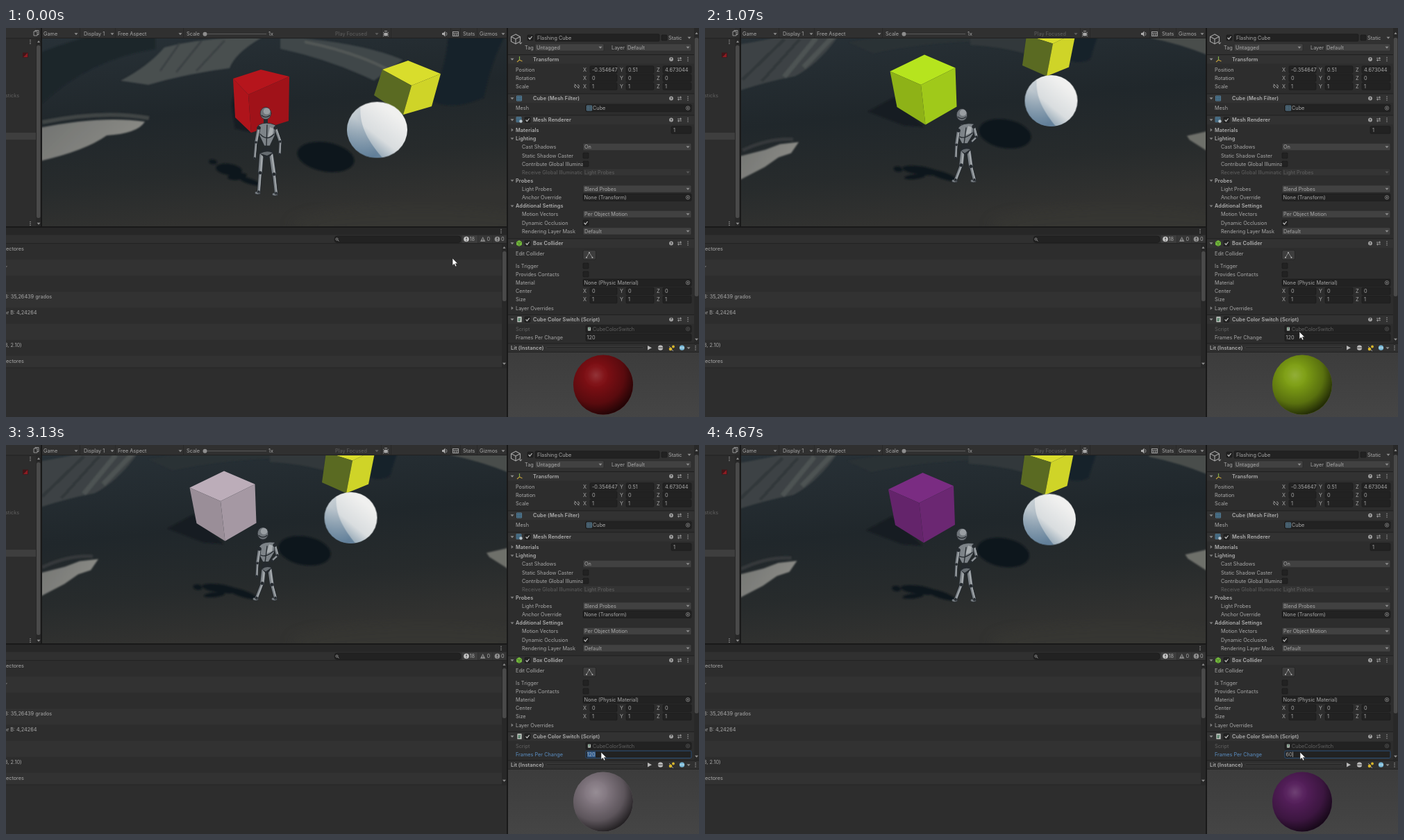
An HTML page for the animation above (4740 ms loop, 998 by 561 pixels).

```html
<!DOCTYPE html>
<html lang="en">
<head>
<meta charset="utf-8">
<title>Flashing cube</title>
<style>
html, body { margin: 0; width: 100%; height: 100%; overflow: hidden; background: #2d2d2d; }
svg { display: block; width: 100%; height: 100%; }
text { font: 7.3px Inter, Roboto, sans-serif; fill: #a8a8a8; white-space: pre; }
.b { font-weight: 600; fill: #b0b0b0; letter-spacing: .1px; }
.d { fill: #606060; }
.hot { fill: #5b8fc4; }
</style>
</head>
<body>
<svg id="stage" viewBox="0 0 998 561" xmlns="http://www.w3.org/2000/svg">
<defs>
  <clipPath id="view"><rect x="52" y="15" width="669" height="271"/></clipPath>
  <clipPath id="unit"><circle r="1"/></clipPath>
  <filter id="soft"><feGaussianBlur stdDeviation="1"/></filter>
  <filter id="haze"><feGaussianBlur stdDeviation="9"/></filter>
  <linearGradient id="ground" x1="0" y1="0" x2=".25" y2="1">
    <stop offset="0" stop-color="#283137"/><stop offset=".45" stop-color="#20272b"/>
    <stop offset=".75" stop-color="#272b2c"/><stop offset="1" stop-color="#323230"/>
  </linearGradient>
  <linearGradient id="patch" x1="0" y1="0" x2="1" y2=".4">
    <stop offset="0" stop-color="#6e706e"/><stop offset="1" stop-color="#8c8c87"/>
  </linearGradient>
  <linearGradient id="white" x1=".15" y1=".92" x2=".75" y2=".2">
    <stop offset="0" stop-color="#5f7f9a"/><stop offset=".28" stop-color="#a3b3bf"/>
    <stop offset=".5" stop-color="#d9dddf"/><stop offset="1" stop-color="#f0f0ef"/>
  </linearGradient>
  <linearGradient id="shade" x1="0" y1=".2" x2=".7" y2="1">
    <stop offset="0" stop-color="#a3b2bd" stop-opacity=".35"/><stop offset="1" stop-color="#557592" stop-opacity=".75"/>
  </linearGradient>
  <radialGradient id="ball" cx=".38" cy=".34" r=".68">
    <stop offset="0" stop-color="#fff" stop-opacity=".15"/><stop offset=".22" stop-color="#fff" stop-opacity=".02"/>
    <stop offset=".3" stop-color="#000" stop-opacity=".04"/><stop offset=".7" stop-color="#000" stop-opacity=".3"/>
    <stop offset="1" stop-color="#000" stop-opacity=".72"/>
  </radialGradient>
  <linearGradient id="back" x1="0" y1="0" x2="0" y2="1">
    <stop offset="0" stop-color="#3b3b3b"/><stop offset="1" stop-color="#454545"/>
  </linearGradient>
</defs>

<g clip-path="url(#view)">
  <rect x="52" y="15" width="669" height="271" fill="url(#ground)"/>
  <g id="farA" filter="url(#soft)">
    <path d="M-20 70Q60 20 215 -10V30Q120 45 52 108Z" fill="#1c252b"/>
    <path d="M228 28Q290 12 368 14Q330 36 322 58Q260 66 205 82L165 76Q205 55 228 28Z" fill="#4a4f50"/>
    <path d="M222 62L250 22M245 64L282 18M274 62L315 18" stroke="#3b4143" stroke-width="3" fill="none"/>
    <path d="M395 15H430Q520 24 572 46L530 76Q468 46 395 30Z" fill="#3f4648"/>
    <path d="M430 20Q500 34 550 60" stroke="#535857" stroke-width="4" fill="none"/>
    <path d="M638 0H725Q700 40 688 100Q640 122 608 102Q634 70 638 0Z" fill="#17212a"/>
    <path d="M30 148Q130 125 200 135Q190 152 145 155Q110 180 30 196Z" fill="url(#patch)"/>
    <path d="M52 136Q140 118 206 130" stroke="#3f4445" stroke-width="6" fill="none"/>
  </g>
  <g id="farB" filter="url(#soft)">
    <path d="M30 30Q110 18 165 0H200Q168 52 128 73Q80 82 30 100Z" fill="#3c4244"/>
    <path d="M140 60L190 8M112 74L158 18" stroke="#4d5353" stroke-width="7" fill="none"/>
    <path d="M52 78L112 20M80 80L134 20" stroke="#30373a" stroke-width="4" fill="none"/>
    <path d="M205 24Q300 8 400 10L455 22Q330 20 240 40Z" fill="#2c3336"/>
    <path d="M380 10H462L458 40Q420 30 380 28Z" fill="#31383a"/>
    <path d="M522 0H569Q558 30 553 48Q540 56 522 50Z" fill="#17212a"/>
    <path d="M640 5H740V50Q690 28 640 18Z" fill="#494d4c"/>
    <path d="M30 193L85 179L106 171L133 168L122 184L104 190L84 204L30 232Z" fill="url(#patch)"/>
    <path d="M52 180Q90 162 125 164" stroke="#34393a" stroke-width="5" fill="none"/>
    <path d="M740 148L692 159L696 165L740 193Z" fill="#6e706b"/>
  </g>
  <ellipse cx="600" cy="285" rx="190" ry="28" fill="#3b3a35" opacity=".45" filter="url(#haze)"/>
  <g id="world"></g>
</g>
<g id="ui"></g>
<g id="live"></g>
</svg>

<script>
const $ = id => document.getElementById(id);
const LOOP = 4740, STEP = 66.67;

// ---------- drawing helpers ----------
const rect = (x, y, w, h, fill, more = '') => `<rect x="${x}" y="${y}" width="${w}" height="${h}" fill="${fill}" ${more}/>`;
const text = (x, y, s, cls = '') => `<text x="${x}" y="${y + 2.6}" class="${cls}">${s}</text>`;
const path = (d, stroke, w = 1, fill = 'none') => `<path d="${d}" fill="${fill}" stroke="${stroke}" stroke-width="${w}"/>`;
const dot = (x, y, r, fill, more = '') => `<circle cx="${x}" cy="${y}" r="${r}" fill="${fill}" ${more}/>`;
const oval = (x, y, rx, ry, fill, more = '') => `<ellipse cx="${x}" cy="${y}" rx="${rx}" ry="${ry}" fill="${fill}" ${more}/>`;
const down = (x, y, c = '#8e8e8e') => path(`M${x - 2.5} ${y - 1.3}h5l-2.5 3z`, 'none', 0, c);
const right = (x, y) => path(`M${x - 1.3} ${y - 2.5}v5l3 -2.5z`, 'none', 0, '#808080');
const up = (x, y) => path(`M${x - 2} ${y + 1}h4l-2 -3z`, 'none', 0, '#8e8e8e');
const dots = (x, y) => [-2.6, 0, 2.6].map(d => dot(x, y + d, .75, '#a0a0a0')).join('');
const field = (x, y, w, s = '', cls = '') => rect(x, y - 5.2, w, 10.4, '#222', 'rx="1.5" stroke="#1a1a1a" stroke-width=".6"') + text(x + 3, y, s, cls);
const drop = (x, y, w, s, off) => rect(x, y - 5.2, w, 10.4, off ? '#343434' : '#414141', 'rx="1.5" stroke="#272727" stroke-width=".6"')
  + text(x + 2, y, s, off ? 'd' : '') + down(x + w - 5, y, off ? '#5a5a5a' : undefined);
const check = (x, y, on) => rect(x - 4, y - 4, 8, 8, '#222', 'rx="1.2" stroke="#191919" stroke-width=".6"')
  + (on ? path(`M${x - 2.4} ${y}l1.8 2l3.2 -4`, '#c0c0c0', 1.2) : '');
const ring = (x, y, c = '#8c8c8c') => dot(x, y, 2.7, 'none', `stroke="${c}" stroke-width=".8"`) + dot(x, y, 1.1, c);
const object = (x, y, s, off) => field(x, y, 987 - x) + text(x + (x > 832 ? 10 : 1.5), y, s, off ? 'd' : '') + ring(982, y, off ? '#555' : undefined);
const vec = (y, name, vals) => text(734, y, name) + vals.map((v, i) => {
  const x = [831, 884, 937][i];
  return text(x, y, 'XYZ'[i]) + field(x + [10, 9, 9][i], y, [39, 40, 41][i], v);
}).join('');
const header = (y, name, on) => rect(723, y - 6.5, 268, 13, '#323232') + rect(723, y - 7, 268, .8, '#1c1c1c')
  + down(729, y) + (on ? check(751, y, true) : '') + text(759, y, name, 'b')
  + dot(958, y, 2.9, '#a5a5a5') + `<text x="956.4" y="${y + 2}" style="font-size:5px;font-weight:700;fill:#323232">?</text>`
  + path(`M967 ${y - 1.4}h6M967 ${y + 1.4}h6M971.5 ${y - 3}v3M968.5 ${y}v3`, '#a0a0a0', .9) + dots(982, y);
const section = (y, name) => down(729, y, '#808080') + text(734, y, name, 'b');
const mesh = (x, y) => path(`M${x - 3.5} ${y - 3.5}h7v7h-7zM${x - 1.2} ${y - 3.5}v7M${x + 1.2} ${y - 3.5}v7M${x - 3.5} ${y - 1.2}h7M${x - 3.5} ${y + 1.2}h7`, '#6a9dba', .7);
const grid = (x, y) => rect(x - 3.5, y - 3.5, 7, 7, '#20394a') + mesh(x, y);
const sheet = (x, y, s) => rect(x - 3.2 * s, y - 4 * s, 6.4 * s, 8 * s, '#b9beb9', 'rx=".6"')
  + `<text x="${x - 2.2 * s}" y="${y + 2.2 * s}" style="font-size:${6 * s}px;font-weight:700;fill:#2f6b4a">#</text>`;

// ---------- static panels ----------
function leftAndTop() {
  const bar = '#303030';
  let s = rect(0, 0, 50, 286, '#2d2d2d') + rect(0, 0, 43, 15, bar) + rect(0, 14.5, 50, .8, '#1f1f1f')
    + rect(0, 151, 43, 10, '#3e3e3e') + rect(43, 15, 7, 271, '#282828') + rect(44, 25, 5.5, 249, '#4a4a4a', 'rx="2.5"')
    + rect(50, 0, 2, 288, '#191919') + dots(35, 20) + dots(35, 282) + up(47, 20) + down(47, 282)
    + path('M40 5h5v6h-5zM42 5v-1.5h5v6h-2', '#a0a0a0', .9)
    + rect(24, 35.5, 8, 7, '#421518') + path('M25 42l6 -6v6z', 'none', 0, '#8c1c22') + text(-1, 97, 'sticks', 'd')
    + rect(52, 0, 669, 15, bar) + rect(52, 14.2, 669, .8, '#1c1c1c');
  for (const [x, name, end, off] of [[54, 'Game', 101], [112, 'Display 1', 153], [161, 'Free Aspect', 251], [474, 'Play Focused', 534, true], [682, 'Gizmos', 716]])
    s += text(x, 8.5, name, off ? 'd' : '') + down(end, 8.5, off ? '#606060' : undefined);
  s += text(260, 8.5, 'Scale') + rect(284, 8, 91, 1.2, '#565656') + dot(286.5, 8.7, 3, '#8e8e8e') + text(378, 8.5, '1x') + text(658, 8.5, 'Stats');
  for (const x of [106, 157, 255, 540, 554, 640, 654, 678]) s += rect(x, 0, .7, 14, '#262626');
  s += dot(547, 9, 2.6, '#a8a8a8') + path('M543 6l8 6M543 12l8 -6M543 9h8M545 4.5h4', '#a8a8a8', .9)
    + path('M628 7h2l2.5 -2.5v8l-2.5 -2.5h-2z', 'none', 0, '#aaa') + path('M634 6q2 2.5 0 5', '#aaa', .8)
    + rect(643.5, 5.5, 8, 6, 'none', 'stroke="#aaa" stroke-width=".9"') + path('M643.5 8h8M646 8v3M649 8v3', '#aaa', .8);
  return s;
}

function consolePanel() {
  let s = rect(0, 286, 722, 275, '#2d2d2d') + rect(0, 286, 722, 2, '#191919') + rect(0, 288, 721, 10.5, '#272727')
    + dots(713, 293) + rect(0, 298.5, 721, 12, '#303030') + rect(0, 310.3, 721, .8, '#1f1f1f');
  for (let i = 1; i < 8; i += 2) s += rect(0, 311 + i * 23.1, 714, 23.1, '#323232');
  s += rect(0, 490, 721, 71, '#2d2d2d') + rect(0, 489.5, 721, .8, '#242424');
  for (const [x, y, t] of [[0, 318, 'ectores'], [0, 341, ','], [-2, 387, '3: 35,26439 grados'], [-3, 410, 'or B: 4,24264'], [-2, 457, '3, 2.10)'], [0, 480, 'ectores']])
    s += text(x, y, t);
  s += rect(714, 311, 7, 179, '#282828') + rect(715, 322, 5.5, 72, '#4a4a4a', 'rx="2.5"') + up(717.5, 317) + down(717.5, 484)
    + rect(473, 300, 182, 9.5, '#222', 'rx="4" stroke="#191919" stroke-width=".6"')
    + dot(476.5, 304.5, 1.5, 'none', 'stroke="#aaa" stroke-width=".8"') + path('M477.6 305.6l1.8 1.8', '#aaa', .9)
    + rect(657, 299, 22, 11, '#3d3d3d') + rect(680, 299, 20, 11, '#363636') + rect(701, 299, 19, 11, '#363636')
    + dot(663, 304.5, 3.8, '#c4c4c4') + rect(662.5, 302, 1.1, 3, '#333') + rect(662.5, 306, 1.1, 1.1, '#333') + text(667.5, 304.8, '18')
    + path('M683 308l3.7 -7l3.7 7z', 'none', 0, '#8a8a8a') + rect(686.2, 303.5, 1, 3, '#333') + text(692.5, 304.8, '0')
    + dot(707.5, 304.5, 3.8, '#8e8e8e') + rect(707, 302, 1.1, 3, '#333') + rect(707, 306, 1.1, 1.1, '#333') + text(713, 304.8, '0');
  return s;
}

function inspector() {
  let s = rect(721, 0, 277, 561, '#2d2d2d') + rect(721, 0, 2, 561, '#191919') + rect(723, 0, 268, 38, '#313131');
  s += path('M734 9l6.5 3.5v7l-6.5 3.5l-6.5 -3.5v-7zM727.5 12.5l6.5 3.5l6.5 -3.5M734 16v7', '#a8a8a8', 1.1) + down(741, 22)
    + check(755, 14, true) + field(762, 14, 179, 'Flashing Cube') + check(948, 14) + text(954, 14, 'Static') + down(984, 14)
    + text(747, 28, 'Tag') + drop(762, 28, 99, 'Untagged') + text(872, 28, 'Layer') + drop(893, 28, 94, 'Default');

  s += header(45, 'Transform') + path('M739.5 41v5l-3.5 3M739.5 46l4 2', '#c4a03c', 1.1) + path('M739.5 41v5', '#7fb04a', 1.1)
    + vec(60, 'Position', ['-0.354647', '0.51', '4.673044']) + vec(72, 'Rotation', [0, 0, 0]) + vec(84, 'Scale', [1, 1, 1])
    + path('M821 82h-1.5q-2 2 0 4h1.5M823 82h1.5q2 2 0 4h-1.5M818.5 81l7 6', '#a0a0a0', .9);

  s += header(101.5, 'Cube (Mesh Filter)') + grid(739, 101.5) + text(734, 115.5, 'Mesh') + object(835, 115.5, 'Cube') + mesh(840, 115.5);

  s += header(132.5, 'Mesh Renderer', true) + grid(738.5, 132) + dot(741.5, 134.5, 2.2, '#b8c4cc')
    + right(729, 147) + text(734, 147, 'Materials', 'b') + field(958, 147, 29, '1') + section(159.5, 'Lighting')
    + text(743, 171.5, 'Cast Shadows') + drop(831, 171.5, 156, 'On') + text(743, 184, 'Static Shadow Caster') + check(835, 184)
    + text(743, 196, 'Contribute Global Illumina') + check(835, 196)
    + text(743, 208, 'Receive Global Illuminatic', 'd') + drop(831, 208, 156, 'Light Probes', true)
    + section(220, 'Probes') + text(743, 232, 'Light Probes') + drop(831, 232, 156, 'Blend Probes')
    + text(743, 244.3, 'Anchor Override') + object(831, 244.3, 'None (Transform)')
    + section(256.7, 'Additional Settings') + text(743, 268.5, 'Motion Vectors') + drop(831, 268.5, 156, 'Per Object Motion')
    + text(743, 281, 'Dynamic Occlusion') + check(835, 281, true) + text(743, 293, 'Rendering Layer Mask') + drop(831, 293, 156, 'Default');

  s += header(310.5, 'Box Collider', true) + path('M739 306l4 2.2v4.6l-4 2.2l-4 -2.2v-4.6z', 'none', 0, '#72b63c') + path('M735 308.2l4 2.2l4 -2.2M739 310.4v4.6', '#3f6e22', .7)
    + text(734, 325.5, 'Edit Collider') + rect(831, 320.5, 18.5, 13.5, '#3d3d3d', 'rx="2" stroke="#222" stroke-width=".7"')
    + path('M836 331l4 -7l4.5 7', '#a0a0a0', .8) + dot(836, 331, 1, '#b5b5b5') + dot(840, 324, 1, '#b5b5b5') + dot(844.5, 331, 1, '#b5b5b5')
    + text(734, 343, 'Is Trigger') + check(835, 343) + text(734, 355, 'Provides Contacts') + check(835, 355)
    + text(734, 367.3, 'Material') + object(831, 367.3, 'None (Physic Material)')
    + vec(379.5, 'Center', [0, 0, 0]) + vec(391.7, 'Size', [1, 1, 1]) + right(729, 404) + text(734, 404, 'Layer Overrides');

  s += header(420.3, 'Cube Color Switch (Script)', true) + sheet(739.5, 420.3, 1)
    + text(734, 434, 'Script', 'd') + object(835, 434, 'CubeColorSwitch', true) + sheet(840, 434, .65);

  s += rect(991, 0, 7, 455, '#282828') + rect(991.7, 14, 5.6, 373, '#4a4a4a', 'rx="2.5"') + up(994.5, 8) + down(994.5, 449)
    + rect(723, 455, 275, 106, 'url(#back)') + rect(723, 454.5, 275, 13, '#303030') + rect(723, 454.5, 275, .8, '#1a1a1a') + rect(723, 467, 275, .8, '#1f1f1f')
    + text(727, 461.3, 'Lit (Instance)', 'b') + rect(778, 459.8, 140, 2.6, '#262626', 'rx="1" stroke="#484848" stroke-width=".6"')
    + path('M924 458v6.5l6 -3.25z', 'none', 0, '#b8b8b8') + dot(942.5, 461.2, 3.6, '#bdbdbd') + path('M939 461.2h7', '#444', 1)
    + dot(957, 463, 2.3, '#d8b62c') + dot(961, 459.5, 1.9, '#d8b62c') + path('M955 459l2 2M959 464l2 2', '#b8b8b8', .8)
    + dot(973.5, 461.2, 3.6, '#79b9d8') + path('M970 461.2h7', '#b8dbe8', 1.2) + down(983, 461.5) + dots(993, 461.3);
  return s;
}

$('ui').innerHTML = leftAndTop() + consolePanel() + inspector();
$('live').innerHTML = `
  <g id="entry"></g><circle id="ballBase" cx="860" cy="514.5" r="43"/><circle cx="860" cy="514.5" r="43" fill="url(#ball)"/>
  ${rect(841, 386.5, 39, 10.4, 'none', 'id="hover" rx="1.5" stroke="#5c5c5c" stroke-width=".8"')}
  <path id="arrow" d="M0 0V10.5L2.5 8.3L4.2 12L6 11.2L4.4 7.7H7.6Z" fill="#fff" stroke="#222" stroke-width=".6"/>
  <path id="beam" d="M-2.5 -4.5Q0 -4.5 0 -3V3Q0 4.5 -2.5 4.5M2.5 -4.5Q0 -4.5 0 -3V3Q0 4.5 2.5 4.5" fill="none" stroke="#e0e0e0" stroke-width="1"/>`;

// ---------- motion ----------
const smooth = p => p * p * (3 - 2 * p);
const mix = (a, b, p) => a.map((v, i) => v + (b[i] - v) * p);
function keyed(keys, t) {
  let i = 0;
  while (i < keys.length - 2 && t >= keys[i + 1][0]) i++;
  const [a, b] = [keys[i], keys[i + 1]];
  return mix(a, b, smooth(Math.min(1, Math.max(0, (t - a[0]) / (b[0] - a[0]))))).slice(1);
}

// time, sideways, cube, ball, head, feet
const SWAY = [[533, 0, 0, 0, 0, 0], [1067, 2, -7, -3.5, 1.2, -4.5], [2333, 1, -10, -5, 2, -5.3],
  [3133, 0, -8, -3.5, 3.5, -3], [3800, 0, -6.5, -2, 4.8, -2], [4667, -.5, -5.5, -1, 5, -1]];
const MOUSE = [[0, 643, 332], [533, 872, 396.5], [1067, 856, 438], [1333, 857, 443]];
// time, red, green, blue, brightness of the left face
const COLOURS = [[0, 182, 21, 28, .96], [800, 182, 228, 30, .78], [1800, 176, 16, 190, .8], [2800, 188, 173, 185, .82],
  [3300, 128, 145, 170, .8], [3800, 176, 202, 147, .8], [4300, 122, 44, 130, .82]];
const colourAt = t => COLOURS.filter(c => c[0] <= Math.max(0, t)).pop().slice(1);
const rgb = ([r, g, b], k) => `rgb(${[r, g, b].map(v => Math.round(v * k))})`;

// cube corners: left, top, right, front, then the lower left, front and right
const CUBE = [[327, 73, 367, 60, 408, 70, 349, 96, 330, 129, 353, 151, 407, 134],
  [264.5, 69.5, 314, 45.5, 358.5, 64.5, 309, 89, 274.5, 121, 315.5, 146.5, 360.5, 120.5]];
const LAMP = [[542, 60, 579, 47, 626, 66, 584, 83, 530, 97, 572, 125, 613, 113],
  [461, 14, 500, -2, 532, 10, 499, 26, 455, 57.5, 490, 73, 522, 60]];
const FACES = [[0, 1, 2, 3], [0, 3, 5, 4], [3, 2, 6, 5]];
const cube = (v, fills) => FACES.map((f, i) =>
  `<polygon points="${f.map(n => v[2 * n].toFixed(2) + ',' + v[2 * n + 1].toFixed(2)).join(' ')}" fill="${fills[i]}"/>`).join('');
const shift = (v, dx, dy) => v.map((n, i) => n + (i % 2 ? dy : dx));

// joints: head, shoulders, waist, elbows and hands, hips, knees and feet
const BODY = [[374, 123, 364, 144, 388, 144, 376, 172, 360, 165, 358, 188, 395, 164, 394, 182, 368, 183, 382, 183, 366, 209, 364, 236, 386, 211, 389, 238],
  [370, 124, 365, 148, 387, 142, 374, 170, 362, 170, 361, 190, 391, 158, 383, 166, 371, 181, 380, 180, 369, 201, 361, 223, 383, 203, 388, 223]];
const DARK = '#24292e', MID = '#7d8388', LIGHT = '#a9aeb1';

function robot(p, head, feet) {
  const v = mix(BODY[0], BODY[1], p);
  const j = n => [v[2 * n], v[2 * n + 1] + head + (feet - head) * (v[2 * n + 1] - 123) / 104];
  const limb = (a, b, w) => {
    const d = `M${j(a)}L${j(b)}`;
    return path(d, DARK, w + 1.4) + path(d, MID, w) + `<g transform="translate(.9 -.4)">${path(d, LIGHT, w * .35)}</g>`;
  };
  const joint = (n, r) => dot(...j(n), r, DARK);
  const foot = n => oval(j(n)[0] - 1.5, j(n)[1] + 1.8, 4, 2.2, MID, `stroke="${DARK}" stroke-width=".6"`);
  const [hx, hy] = j(0), [lx, ly] = j(1), [rx, ry] = j(2), [wx, wy] = j(3), [ax, ay] = j(8), [bx, by] = j(9);
  return '<g stroke-linecap="round">' + foot(11) + foot(13)
    + limb(8, 10, 5.4) + limb(10, 11, 3.8) + limb(9, 12, 5.4) + limb(12, 13, 3.8)
    + joint(10, 2.2) + joint(12, 2.2) + joint(11, 1.7) + joint(13, 1.7)
    + limb(2, 6, 3.6) + limb(6, 7, 2.6)
    + path(`M${ax - 3} ${ay - 3}L${wx - 4} ${wy}H${wx + 4}L${bx + 3} ${by - 3}L${(ax + bx) / 2} ${by + 7}Z`, 'none', 0, DARK)
    + path(`M${ax - 2} ${ay - 2}Q${wx} ${wy + 4} ${bx + 2} ${by - 3}L${wx} ${wy + 12}Z`, 'none', 0, '#666c71')
    + path(`M${hx - 3} ${hy + 6}h6v9h-6z`, 'none', 0, DARK)
    + path(`M${lx} ${ly - 4}Q${hx} ${hy + 11} ${rx} ${ry - 4}L${rx - 1} ${ry + 11}L${wx + 4} ${wy - 2}H${wx - 4}L${lx + 1} ${ly + 11}Z`, DARK, .8, MID)
    + path(`M${rx - 8} ${ry - 1}L${rx - 3} ${ry + 1}L${rx - 4} ${ry + 9}L${wx + 1} ${wy - 14}Z`, 'none', 0, LIGHT)
    + path(`M${wx - 1} ${wy - 1}L${(lx + rx) / 2} ${ly - 4}M${lx + 2} ${ly + 9}Q${wx} ${wy - 8} ${rx - 2} ${ry + 9}`, DARK, 1.3)
    + limb(1, 4, 3.8) + limb(4, 5, 2.8)
    + joint(1, 2.6) + joint(2, 2.6) + joint(4, 1.6) + joint(6, 1.6) + joint(5, 1.8) + joint(7, 1.8)
    + oval(hx, hy, 7.8, 8.8, '#6f757a', `stroke="${DARK}" stroke-width=".7"`) + oval(hx + 1.5, hy - 3, 4.8, 4.6, '#999ea2')
    + path(`M${hx - 6} ${hy + 3}q6 5 12 0`, DARK, 1.2) + '</g>';
}

function scene(t) {
  const p = smooth(Math.min(1, t / 533));
  const [dx, dc, db, head, feet] = keyed(SWAY, t);
  $('farA').setAttribute('transform', `translate(${-60 * p} ${-40 * p})`);
  $('farA').setAttribute('opacity', 1 - p);
  $('farB').setAttribute('transform', `translate(${60 * (1 - p) + dx} ${40 * (1 - p) + db})`);
  $('farB').setAttribute('opacity', p);

  const box = shift(mix(CUBE[0], CUBE[1], p), dx, dc);
  const lamp = shift(mix(LAMP[0], LAMP[1], p), dx, db);
  const [bx, by, rx, ry] = mix([534.5, 147, 43.5, 40.5], [496.5, 108.5, 38, 37], p);
  const spot = (a, b, dy, turn) => {
    const [x, y, w, h] = mix(a, b, p);
    return `<ellipse rx="${w}" ry="${h}" transform="translate(${x + dx} ${y + dy}) rotate(${turn})" fill="#11191f"/>`;
  };
  const blot = mix([325, 110, 331, 85, 353, 150, 330, 145], [233, 124, 270, 104, 313, 146, 285, 144], p);
  const c = colourAt(t);
  $('world').innerHTML = `<g filter="url(#soft)">`
    + `<polygon points="${shift(blot, dx, db).join(' ')}" fill="#151c22"/>`
    + spot([460.5, 186, 41.5, 21], [430, 156, 38, 20.5], db, 10)
    + spot([298, 193, 6, 3.5], [276, 208, 6.5, 4], feet, 10) + spot([321, 204, 19, 8], [308, 210, 26, 6], feet, 8)
    + spot([333, 214, 14, 5], [300, 219, 15, 3.5], feet, -6) + spot([351, 221, 16, 4], [340, 217, 22, 5], feet, 18) + '</g>'
    + cube(lamp, ['#d9dd2c', '#5a6a22', '#cfd428'])
    + `<g transform="translate(${bx + dx} ${by + db}) scale(${rx} ${ry})"><circle r="1" fill="url(#white)"/>`
    + `<path clip-path="url(#unit)" d="M-.55 -.84C-.6 -.1 -.25 .45 .18 1L-1 1V-.84Z" fill="url(#shade)"/></g>`
    + cube(box, [rgb(c, 1), rgb(c, c[3]), rgb(c, .88)])
    + robot(p, head, feet);
}

function entry(t) {
  const focus = t >= 1400, typed = t < 3267 ? '120' : t < 3400 ? '6' : '60';
  let s = text(734, 446.3, 'Frames Per Change', focus ? 'hot' : '') + field(835, 446.3, 152);
  if (focus) s += rect(835, 441.1, 152, 10.4, 'none', 'rx="1.5" stroke="#305c8c" stroke-width=".8"');
  if (focus && typed === '120') s += rect(837, 442.3, 12, 8, '#2f5f96');
  s += text(836.5, 446.3, typed);
  if (typed !== '120') s += rect(typed === '6' ? 841.5 : 846.2, 442.5, .7, 7.6, '#c0c0c0');
  $('entry').innerHTML = s;
}

function draw(t) {
  scene(t);
  entry(t);
  $('ballBase').setAttribute('fill', rgb(colourAt(t - 67), .7));
  const at = `translate(${keyed(MOUSE, t).join(' ')})`, beam = t > 450 && t < 690;
  $('arrow').setAttribute('transform', at);
  $('beam').setAttribute('transform', at);
  $('arrow').style.display = beam ? 'none' : '';
  $('beam').style.display = $('hover').style.display = beam ? '' : 'none';
}

let last = -1;
function tick() {
  const step = Math.min(70, Math.floor((performance.now() % LOOP + 4) / STEP));
  if (step !== last) draw((last = step) * STEP + .5);
  requestAnimationFrame(tick);
}
tick();
</script>
</body>
</html>
```
